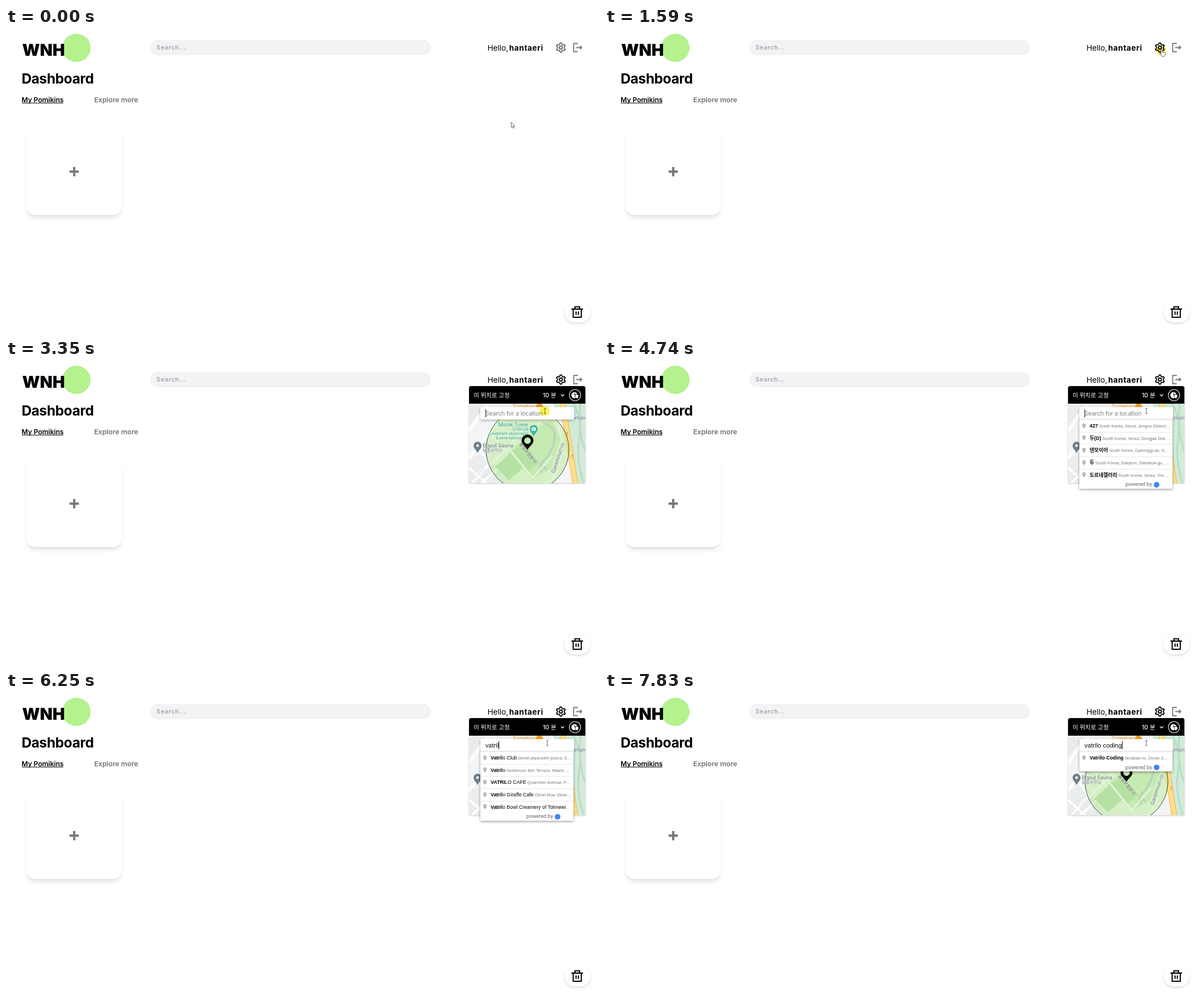
These frames come from a looping animation (1045x536 px, 8 s). An HTML page:

```html
<!DOCTYPE html>
<html lang="en">
<head>
<meta charset="utf-8">
<title>Dashboard</title>
<style>
html, body { margin: 0; width: 100%; height: 100%; overflow: hidden; background: #fff; }
#stage { position: relative; width: 1045px; height: 536px; overflow: hidden; background: #fff;
  font-family: Inter, "Noto Sans CJK KR", "Noto Sans CJK", sans-serif; }
#stage > * { position: absolute; }
svg { left: 0; top: 0; width: 1045px; height: 536px; }
.line { fill: none; stroke-linecap: round; stroke-linejoin: round; }
.card { left: 36px; top: 173px; width: 168px; height: 157px; border-radius: 16px;
  box-shadow: 0 6.8px 10px -2px rgba(0,0,0,.1), 0 2.7px 4px -2.7px rgba(0,0,0,.1); }
.pill { left: 984px; top: 483px; width: 46px; height: 36px; border-radius: 18px;
  box-shadow: 0 2px 4px rgba(0,0,0,.14); }
.place { font-family: Roboto, "Noto Sans CJK KR", "Noto Sans CJK", sans-serif; paint-order: stroke;
  stroke: #fff; stroke-opacity: .6; stroke-width: 1px; }
#popup { filter: drop-shadow(0 1.5px 1.5px rgba(0,0,0,.22)); }
#field { left: 836px; top: 82.5px; width: 156.5px; height: 22px; padding-left: 8.5px; border-radius: 2px;
  background: #fff; box-shadow: 0 1.4px 4px rgba(0,0,0,.3); line-height: 22.5px; font-size: 10.9px;
  letter-spacing: -.025em; white-space: pre; color: #111; }
#caret { display: inline-block; width: 1px; height: 14px; margin-right: -1px; background: #000; vertical-align: -3px; }
#hint { color: #80848b; }
#list { left: 836px; top: 105px; width: 163.5px; background: #fff; border-radius: 1.4px; overflow: hidden;
  box-shadow: 0 1.4px 4px rgba(0,0,0,.4); font-family: "Liberation Sans", "Noto Sans CJK KR", "Noto Sans CJK", sans-serif; }
.row { position: relative; box-sizing: border-box; height: 21.7px; line-height: 21px; padding: 0 3.5px 0 18px;
  border-top: 1px solid #e6e6e6; font-size: 7.45px; color: #777; white-space: nowrap; overflow: hidden; text-overflow: ellipsis; }
.row span { font-size: 8.8px; color: #000; padding-right: 2px; }
.row svg { position: absolute; left: 5px; top: 5.5px; width: 6px; height: 10px; }
.foot { position: relative; height: 13.5px; padding-left: 81px; font: 9.2px/12px Roboto, sans-serif; color: #666; }
.foot i { position: absolute; left: 131px; top: 1.5px; width: 10px; height: 10px; border-radius: 50%; background: #4285f4; }
#tap { mix-blend-mode: multiply; }
</style>
</head>
<body>
<div id="stage">
  <div class="card"></div>
  <div class="pill"></div>

  <svg viewBox="0 0 1045 536">
    <circle cx="124" cy="35" r="25" fill="#b4f28e"/>
    <text x="28.5" y="48.5" font-size="28.9" font-weight="900">WNH</text>
    <rect x="254" y="21" width="495" height="27" rx="13.5" fill="#f2f3f5"/>
    <text x="265" y="38.4" font-size="10.9" font-weight="600" letter-spacing=".545" fill="#a3a6aa">Search...</text>
    <text x="848.5" y="39.5" font-size="13.6">Hello,</text>
    <text x="886.8" y="39.5" font-size="13.6" font-weight="700" letter-spacing=".6">hantaeri</text>

    <g id="gear" fill="none" stroke="#666" stroke-width="2" stroke-linejoin="round" transform="translate(977.8 34.5) scale(.907)">
      <path id="teeth"/><circle r="3"/>
    </g>
    <path fill="none" stroke="#777" stroke-width="2" transform="translate(996.8 23.6) scale(.907)" d="M12 4H4V20H12M9 12H19.500M16.300 8.700L19.600 12L16.300 15.300"/>

    <text x="27.4" y="98.2" font-size="24.5" font-weight="700" letter-spacing="-.38">Dashboard</text>
    <text x="27.6" y="131" font-size="12" font-weight="600">My Pomikins</text>
    <rect x="28" y="131.8" width="73" height="1"/>
    <text x="155.4" y="131" font-size="12.2" font-weight="600" fill="#737373">Explore more</text>
    <path d="M112 253.2H128.4M120.2 245V261.4" stroke="#777" stroke-width="4"/>

    <path fill="none" stroke="#000" stroke-width="2" transform="translate(994.4 488.500) scale(1.02)" d="M2 7H22M8 7V3H16V7M5 7V21H19V7M10 11V17M14 11V17"/>
  </svg>

  <svg id="popup" viewBox="0 0 1045 536">
    <clipPath id="mapBox"><path id="sheet" d="M816 77H1021V214q0 3-3 3H819q-3 0-3-3z"/></clipPath>
    <use href="#sheet" fill="#f3f4f6"/>
    <path d="M816 77V49.5q0-3.5 3.5-3.5H1017.5q3.5 0 3.5 3.5V77z"/>
    <g clip-path="url(#mapBox)">
      <g id="ground">
        <path d="M816 77H846L816 116zM816 177L842 160L884 217H816z" fill="#eaecee"/>
        <path d="M962 77H1021V217H1003L986 118z" fill="#d0ebd8"/>
        <path class="line" stroke="#b9dcc6" stroke-width="3" d="M1000 77Q1016 105 1010 140T1018 217M1012 77Q1008 130 1021 160"/>
        <path class="line" stroke="#fff" stroke-width="4" d="M812 131L850 77M812 178L852 128L906 77M822 217L852 183L836 160M838 217L872 186M816 190L846 217M852 128L884 165M962 77Q984 128 976 172T950 217"/>
        <path class="line" stroke="#dcdfe2" stroke-width="1" d="M818 96L830 82M820 106L838 84M822 200L838 188M828 206L846 192M834 212L856 196"/>
        <path d="M981 77L1004 222" stroke="#f3b64c" stroke-width="10"/>
        <path d="M981 77L1004 222" stroke="#fddf8b" stroke-width="8"/>
        <path class="line" stroke="#d59a35" stroke-width="1" d="M998 174V167M996.5 169L998 167L999.5 169M989 134V127M987.5 129L989 127L990.5 129"/>
      </g>
      <g id="zone">
        <circle cx="919" cy="158" r="73" fill="#b9ec9a" fill-opacity=".5"/>
        <path d="M884 165L922 130L962 104L978 140L960 192L928 210z" fill="#c6ebb2"/>
        <path d="M862 188L890 163L916 186L886 212zM892 162L910 146L940 181L921 197z" fill="#b5e2a3"/>
        <path class="line" stroke="#bbd5b8" stroke-width="4" d="M948 112Q970 118 967 138T951 174Q937 186 944 197M938 196q8-10 14-4"/>
        <path class="line" stroke="#e2f4d7" stroke-width="3" d="M853 186L884 154L914 120M884 154L928 208L962 170"/>
        <circle cx="919" cy="158" r="73" fill="none" stroke="#3c4a3a"/>
      </g>
      <g id="labels" class="place" fill="#65747f">
        <text x="893" y="84.5" font-size="9.5" fill="#e8860c">Tomehari</text>
        <circle cx="940" cy="83" r="6.5" fill="#f29a1f"/>
        <text x="997" y="105" font-size="9.5">omareu</text>
        <g fill="#32a08a" text-anchor="end">
          <text x="921" y="117" font-size="9.3">Morak Tower</text>
          <text x="921" y="125" font-size="7.8">모락타워</text>
          <text x="921" y="132.3" font-size="7.3">Landmark skyscraper</text>
          <text x="921" y="139.8" font-size="7.3">&amp; entertainment...</text>
        </g>
        <path d="M930 136C929 130 923 128 923 121.5A7 7 0 0 1 937 121.5C937 128 931 130 930 136z" fill="#3fb8a0"/>
        <path d="M926.5 119.5h2l.7-1.2h1.8l.7 1.2h2v5h-7.2z" fill="#fff" stroke="none"/>
        <circle cx="930" cy="122" r="1.3" stroke="none" fill="#3fb8a0"/>
        <text x="840" y="154" font-size="9.7">Bopul Sauna</text>
        <text x="840" y="162" font-size="7.5">보풀사우나</text>
        <path d="M831 165C830 159 824 157 824 151A7 7 0 0 1 838 151C838 157 832 159 831 165z" fill="#6b7f8c"/>
        <circle cx="831" cy="151" r="2.4" fill="#fff" stroke="none"/>
        <text transform="translate(904 148) rotate(52)" font-size="8" fill="#4d5a50">돌샘보험본사</text>
        <text transform="translate(967 200) rotate(-72)" font-size="9.6">Garamnuri-ro</text>
      </g>
      <path id="pin" fill-rule="evenodd" d="M919 158.500C917 153 908.500 149 908.500 142A10.500 10.500 0 0 1 929.500 142C929.500 149 921 153 919 158.500zM919 136.500a5.700 5.700 0 1 0 .01 0z"/>
    </g>
    <g fill="#fff" font-size="10.5" font-weight="500">
      <text x="824" y="66">이 위치로 고정</text>
      <text x="946" y="66">10 분</text>
    </g>
    <path class="line" stroke="#fff" stroke-width="1.2" d="M978.3 61L980.8 63.500L983.3 61"/>
    <circle cx="1002.7" cy="62" r="10" fill="none" stroke="#fff" stroke-width="1.1"/>
    <circle cx="1001.7" cy="62" r="5.4" fill="#fff"/>
    <path class="line" stroke="#000" d="M1002 58.5V62L1004.5 60.5"/>
    <path d="M1006 69C1005 66.5 1002.8 66 1002.8 63.8a3.2 3.2 0 0 1 6.4 0C1009.2 66 1007 66.5 1006 69z" fill="#fff" stroke="#000" stroke-width=".8"/>
  </svg>

  <div id="field"><span id="typed"></span><i id="caret"></i><span id="hint">Search for a location</span></div>
  <div id="list"></div>

  <svg viewBox="0 0 1045 536" id="tap"><circle id="spot" r="8.5" fill="#fff04a"/></svg>
  <svg viewBox="0 0 1045 536">
    <g id="cursor" class="line" stroke="#444" stroke-width=".8">
      <path id="arrow" fill="#fff" d="M.4.4V9.2L2.4 7.4L3.9 10.7L5.2 10.1L3.8 6.9H6.5z"/>
      <path id="hand" fill="#fff" d="M-1.2 1a1.2 1.2 0 0 1 2.4 0V5l4.3.9q1.2.3 1 1.5l-.7 3.7q-.3 1.6-1.7 1.6H.6L-3.2 8q.2-1.4 1.4-.6l.6.7z"/>
      <path id="beam" d="M-1.5-4.7Q0-4.7 0-3.7Q0-4.7 1.5-4.7M0-3.7V3.7M-1.5 4.7Q0 4.7 0 3.7Q0 4.7 1.5 4.7"/>
    </g>
  </svg>
</div>

<script>
const LOOP = 8000;
const $ = id => document.getElementById(id);
const show = (id, on) => { $(id).style.display = on ? '' : 'none'; };

const polar = (r, deg) => {
  const a = deg * Math.PI / 180;
  return (r * Math.cos(a)).toFixed(2) + ' ' + (r * Math.sin(a)).toFixed(2);
};
const teeth = [];
for (let a = -90; a < 270; a += 60)
  teeth.push(polar(6.8, a - 19), polar(9.1, a - 8), polar(9.1, a + 8), polar(6.8, a + 19));
$('teeth').setAttribute('d', 'M' + teeth.join('L') + 'z');

// Suggestions: [name, detail]
const korean = [
  ['427', 'South Korea, Seoul, Jongno District, Center'],
  ['두(D)', 'South Korea, Seoul, Dongjak District, South'],
  ['댄모이어', 'South Korea, Gyeonggi-do, Goyang-si'],
  ['두', 'South Korea, Daejeon, Daedeok-gu, North'],
  ['도르네갤러리', 'South Korea, Seoul, Yongsan District']
];
const cities = [
  ['Vancouver', 'BC, Canada'],
  ['Vardmor Halls', 'Pike Oak Halls Drive, Vancouver'],
  ['Vatican City', ''],
  ['Vancouver', 'WA'],
  ['Vail', 'CO']
];
const cafes = [
  ['Vatrilo Club', 'Devet planinskih jezera, Split'],
  ['Vatrilo', 'Northmoor Elm Terrace, Miami, Florida'],
  ['VATRILO CAFE', 'Quarrimor Avenue, Philadelphia'],
  ['Vatrilo Giraffe Cafe', 'Olmet Row Street, New York'],
  ['Vatrilo Bowl Creamery of Tolmewick', '']
];
const coffee = [
  ['Vatrilo Coffee', 'Quarrimor Avenue, Portland'],
  ['Vatrilo Corner', 'Northmoor Elm Terrace, Miami'],
  ['Vatrilo Cocoa', 'Olmet Row Street, New York'],
  ['Vatrilo Cove', 'Pike Oak Halls Drive, Toronto'],
  ['Vatrilo Cookies', 'Devet planinskih jezera, Split']
];
const coding = [['Vatrilo Coding', 'Noraban-ro, Doran 2-dong, Seoul']];

// [time, suggestions, bold letters]
const lists = [
  [0], [4740, korean, 9], [4810], [5410, cities, 2], [6080, cafes, 5],
  [6500, cafes, 7], [7490, coffee, 10], [7830, coding, 14]
];
const word = 'vatrilo coding';
const keys = [5010, 5140, 5670, 5820, 6010, 6240, 6370, 6830, 6960, 7090, 7360, 7430, 7490, 7620];

const rowHtml = ([name, detail], bold) =>
  `<div class="row"><svg viewBox="0 0 6 10"><path fill="#aaa" fill-rule="evenodd" d="M3 10C2.7 6.5 0 5.5 0 3a3 3 0 0 1 6 0C6 5.5 3.3 6.5 3 10zM3 2a1 1 0 1 0 .01 0z"/></svg>` +
  `<span><b>${name.slice(0, bold)}</b>${name.slice(bold)}</span>${detail}</div>`;

let shown = null;
function drawList(t) {
  const now = lists.filter(l => l[0] <= t).pop();
  if (now === shown) return;
  shown = now;
  show('list', now[1]);
  if (now[1])
    $('list').innerHTML = now[1].map(r => rowHtml(r, now[2])).join('') + '<div class="foot">powered by<i></i></div>';
}

// Stepped pointer moves: [start, end, steps, x, y]
const moves = [
  [260, 1050, 12, 978, 44],
  [1110, 1390, 5, 981, 37.5],
  [2400, 2930, 9, 949.8, 90],
  [3550, 3620, 2, 954, 90]
];
function pointer(t) {
  let x = 890, y = 166;
  for (const [start, end, n, tx, ty] of moves) {
    if (t < start) break;
    const k = Math.min(n, Math.floor((t - start) / (end - start) * (n - 1) + 1e-6) + 1) / n;
    const e = k * k * (3 - 2 * k);
    x += (tx - x) * e;
    y += (ty - y) * e;
  }
  return [x, y];
}

function draw(t) {
  const [x, y] = pointer(t);
  const beam = t > 2400 && y > 82;
  const hand = t >= 1180 && !beam && y < 46;
  $('cursor').setAttribute('transform', `translate(${x} ${y})`);
  show('beam', beam);
  show('hand', hand);
  show('arrow', !beam && !hand);

  const tapGear = t >= 1520 && t < 1730;
  const tapField = t >= 3350 && t < 3550;
  show('tap', tapGear || tapField);
  $('spot').setAttribute('transform', tapGear ? 'translate(980 39.5)' : 'translate(949 90)');
  $('gear').setAttribute('stroke', t >= 1180 ? '#000' : '#666');

  show('popup', t >= 1790);
  show('field', t >= 1930);
  show('ground', t >= 1930);
  show('zone', t >= 2000);
  show('labels', t >= 2000);
  show('pin', t >= 2070);

  const text = t >= 4280 && t < 4740 ? 'ㄷ' : word.slice(0, keys.filter(k => k <= t).length);
  $('typed').textContent = text;
  show('hint', !text);
  $('caret').style.visibility = t >= 3350 && !(t >= 3880 && t < 4280) ? '' : 'hidden';
  drawList(t);
}

const begin = performance.now();
function tick() {
  draw((performance.now() - begin) % LOOP);
  requestAnimationFrame(tick);
}
tick();
</script>
</body>
</html>
```
